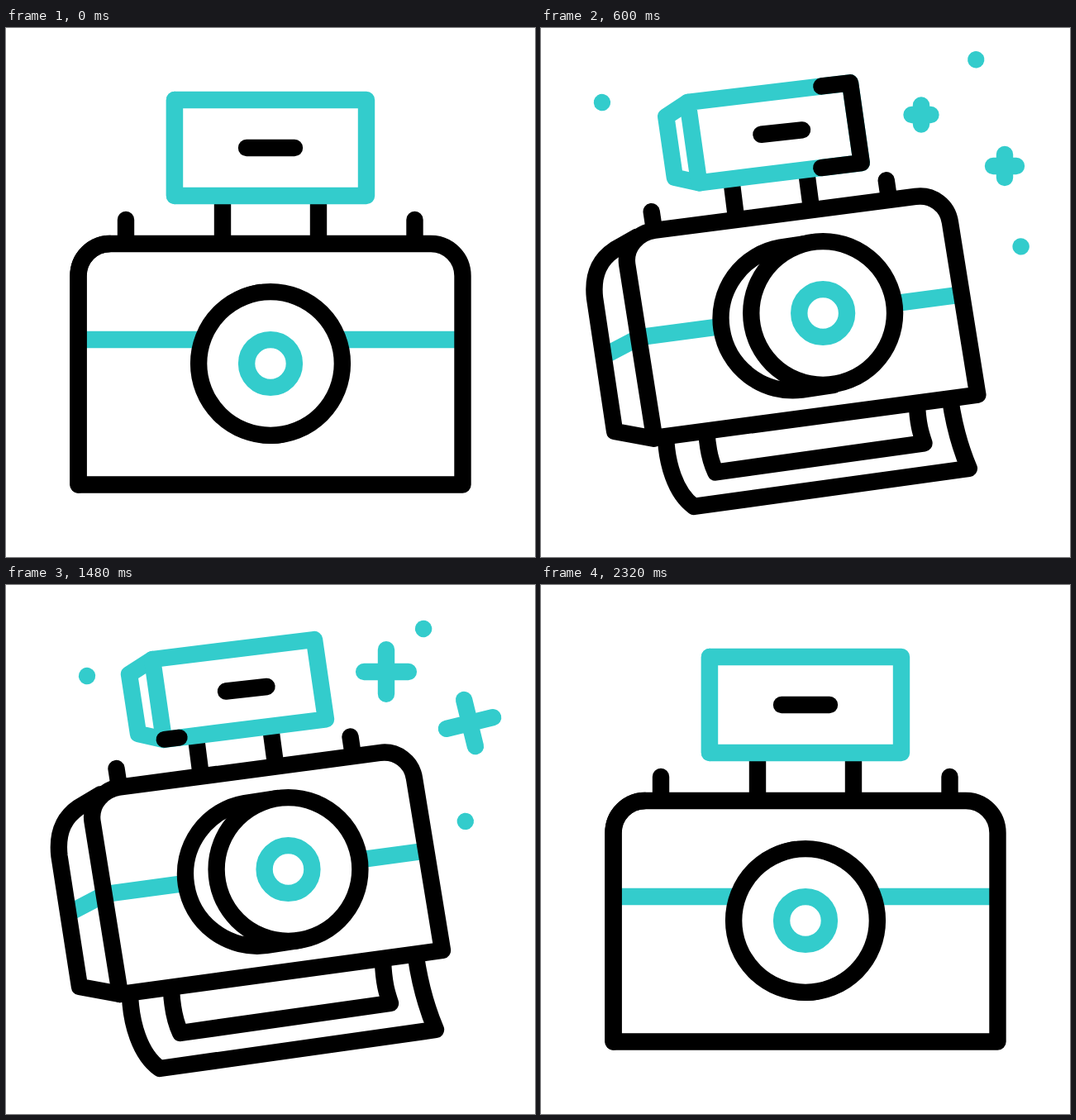
These frames come from a looping animation (640 by 640 pixels, 2600 ms). An HTML page:

```html
<!DOCTYPE html>
<html lang="en">
<head>
<meta charset="utf-8">
<title>Instant camera</title>
<style>
  html, body { margin: 0; width: 100%; height: 100%; overflow: hidden; background: #fff; }
  svg { display: block; width: 100vw; height: 100vh; }
  path, circle {
    fill: none; stroke: #000; stroke-width: 20.4;
    stroke-linecap: round; stroke-linejoin: round;
  }
  .teal { stroke: #3cc; }
  .butt { stroke-linecap: butt; }
  .solid { fill: #fff; }
  .fill { fill: #fff; stroke: none; }
  .pose, .paper, .side, .runner, .plus, .dot { animation: pose 2600ms linear infinite; }

  /* --a is the resting shape, --b the tilted one, --m a plain shift */
  @keyframes pose {
    0%, 2.69% { d: var(--a); translate: 0px 0px; animation-timing-function: cubic-bezier(.4, 0, .45, 1); }
    25.77% { d: var(--b); translate: var(--m, 0px 0px); }
    62% { d: var(--b); translate: var(--m, 0px 0px); animation-timing-function: cubic-bezier(.4, 0, .2, 1); }
    85.1%, 100% { d: var(--a); translate: 0px 0px; }
  }

  /* depth edges pass through --up while tilting, --down and --low on the way back */
  .side { animation-name: side; }
  @keyframes side {
    0%, 2.69% { d: var(--a); animation-timing-function: cubic-bezier(.5, 0, .8, .75); }
    15.38% { d: var(--up); animation-timing-function: ease-out; }
    25.77% { d: var(--b); }
    62% { d: var(--b); animation-timing-function: ease-in; }
    69.23% { d: var(--down); }
    73.85% { d: var(--low); animation-timing-function: ease-out; }
    85.1%, 100% { d: var(--a); }
  }

  .paper { animation-name: paper; }
  @keyframes paper {
    0%, 15.38% { d: var(--a); animation-timing-function: cubic-bezier(.3, .2, .5, 1); }
    25.4% { d: var(--b); }
    61.54% { d: var(--b); animation-timing-function: cubic-bezier(.3, .1, .8, .8); }
    69.23% { d: var(--down); }
    73.08%, 100% { d: var(--a); }
  }

  /* black line running round the flash */
  .runner { animation-name: pose, runner; animation-duration: 2600ms, 2600ms; }
  @keyframes runner {
    0%, 9.2% { stroke-width: 0; stroke-dasharray: .1 99.9; stroke-dashoffset: -16; }
    10% { stroke-width: 20.4; stroke-dasharray: .1 99.9; stroke-dashoffset: -16.5; }
    15.38% { stroke-dasharray: 6.3 93.7; stroke-dashoffset: -20.2; }
    33.85% { stroke-dasharray: 64.5 35.5; stroke-dashoffset: -32.1; animation-timing-function: cubic-bezier(.4, .2, .7, .9); }
    56.92% { stroke-width: 20.4; stroke-dasharray: 3.2 96.8; stroke-dashoffset: -100; }
    58.46%, 100% { stroke-width: 0; stroke-dasharray: .1 99.9; stroke-dashoffset: -103; }
  }

  .plus { vector-effect: non-scaling-stroke; }
  .one { animation-name: plus-one; }
  .two { animation-name: plus-two; }
  @keyframes plus-one {
    0%, 18.46% { scale: .01; stroke-width: 0; }
    20% { scale: .08; stroke-width: 20.4; animation-timing-function: ease-out; }
    33.85%, 53.85% { scale: 1; }
    56.92% { scale: .93; }
    66.15% { scale: .05; stroke-width: 20.4; }
    67.69%, 100% { scale: .01; stroke-width: 0; }
  }
  @keyframes plus-two {
    0%, 18.46% { scale: .01; stroke-width: 0; rotate: 0deg; }
    20% { scale: .25; stroke-width: 20.4; }
    23.08% { scale: .48; animation-timing-function: ease-out; }
    33.85% { scale: .9; }
    41.54% { scale: 1; }
    53.85% { rotate: 0deg; }
    56.92% { scale: 1; rotate: -13.5deg; }
    66.15% { scale: .55; rotate: -75deg; }
    69.23% { scale: .24; rotate: -90deg; }
    71.54% { scale: .02; stroke-width: 20.4; }
    73.08%, 100% { scale: .01; stroke-width: 0; rotate: -90deg; }
  }

  .dot { fill: #3cc; stroke: none; animation-name: orbit; }
  @keyframes orbit {
    0%, 18.46% { r: 0; rotate: calc(var(--s) - 19deg); }
    20% { r: 10.2px; rotate: calc(var(--s) - 17deg); }
    33.85% { rotate: var(--s); }
    44.62% { rotate: calc(var(--s) + 13deg); }
    56.92% { rotate: calc(var(--s) + var(--mid)); }
    69.23% { rotate: calc(var(--s) + var(--end)); }
    71.54% { r: 10.2px; rotate: calc(var(--s) + var(--end) + 6deg); }
    73.08%, 100% { r: 0; rotate: calc(var(--s) + var(--end) + 8deg); }
  }

  .front {
    --a: path("M87.5 552.5 L87.5 300 C87.5 278 105 261 126 261 L514 261 C535 261 552.5 278 552.5 300 L552.5 552.5 Z");
    --b: path("M138 495 L104.5 286 C101.5 265 117 247.5 138 244.5 L452 203 C473 200 491 214 494 234 L528 442 Z");
  }
  .depth {
    --a: path("M87.5 552.5 L87.5 552.5 L87.5 300 C87.5 278 105 261 126 261 L126 261");
    --up: path("M124 513 L90 506 L70 316 C68 289 79 270 99 261 L130 249");
    --b: path("M138 495 L89 486 L64.5 328 C61 297 72 280 88 269 L114 253.5");
    --down: path("M116 519 L88 511 L70 314 C69 288 82 268 103 260 L127 251");
    --low: path("M98 540 L86.5 532 L79 304 C79 281 95 262 117 258 L127 257");
  }
  .barrel {
    --a: path("M307 320 L307 320 A87 87 0 0 0 333 492 L333 492");
    --up: path("M323 277 L295 281 A87 87 0 0 0 321 453 L349 449");
    --b: path("M328.5 258 L289 264 A87 87 0 0 0 315 436 L354.5 430");
    --down: path("M319 283.5 L295.5 286 A87 87 0 0 0 321.5 458 L345 455.5");
    --low: path("M310.5 306.5 L302.3 307 A87 87 0 0 0 328.3 479 L336.5 478.5");
  }
  .flash {
    --a: path("M204 203 L436 203 L436 87 L204 87 Z");
    --b: path("M191 187 L387 162.5 L373 66 L177 90 Z");
  }
  .flash-depth {
    --a: path("M204 87 L204 87 L204 203 L204 203");
    --up: path("M185 89 L172 100 L179 187 L195 191");
    --b: path("M177 90 L149 108 L160 180 L191 187");
    --down: path("M186 88 L176.5 98 L183 190 L195 192");
    --low: path("M197 87 L189.5 94 L193 197 L200 199");
  }
  .outer {
    --a: path("M165 455 C165 465 166 477 170 485 L485 455 C482 450 480 440 480 430");
    --b: path("M150 495 C151 530 162 568 186 585 L520 538 C509 512 501 484 496 450");
    --down: path("M145 505 C146 513 150 525 158 534 L496 504 C492 498 490 492 489 480");
  }
  .inner {
    --a: path("M205 445 C205 450 208 460 215 468 L440 445 C438 440 436 430 436 425");
    --b: path("M200 490 C201 510 204 527 211 542 L465 506 C461 494 457 482 456 455");
    --down: path("M180 490 C180 498 182 505 187 510 L455 482 C453 476 452 470 452 460");
  }
</style>
</head>
<body>
<svg viewBox="0 0 640 640">
  <path class="paper outer"/>
  <path class="paper inner"/>

  <!-- pins and flash legs -->
  <path class="pose" style="--a:path('M145 232 L145 261 M494.5 232 L494.5 261'); --b:path('M133.5 222 L137 245 M416.5 183.5 L420 207')"/>
  <path class="pose butt" style="--a:path('M262 200 L262 261 M378 200 L378 261'); --b:path('M230 185 L236 232 M320 172 L326.5 220')"/>

  <!-- body -->
  <path class="pose front fill"/>
  <path class="pose teal butt" style="--a:path('M87.5 377 L87.5 377 L552.5 377'); --b:path('M75 397.5 L120 374 L505 322')"/>
  <path class="side depth"/>
  <path class="pose front"/>

  <!-- lens -->
  <path class="side barrel solid"/>
  <g class="pose" style="--m:21.5px -62px">
    <circle class="solid" cx="320" cy="406" r="86.9"/>
    <circle class="teal" cx="320" cy="406" r="28.9"/>
  </g>

  <!-- flash -->
  <path class="side flash-depth teal"/>
  <path class="pose flash teal solid"/>
  <path class="pose" style="--a:path('M291 145 L349 145'); --b:path('M266 128.5 L315.5 123')"/>
  <path class="runner flash" pathLength="100"/>

  <!-- sparkles -->
  <g transform="translate(460 105)"><path class="plus one teal" d="M-29 0H29M0-29V29"/></g>
  <g transform="translate(561 167)"><path class="plus two teal" d="M-29 0H29M0-29V29"/></g>
  <g transform="translate(82.3 104.5)"><circle class="dot" cx="16.7" style="--s:253deg; --mid:126deg; --end:202deg"/></g>
  <g transform="translate(512.5 41.1)"><circle class="dot" cx="14" style="--s:1.6deg; --mid:120deg; --end:185deg"/></g>
  <g transform="translate(565.6 272.1)"><circle class="dot" cx="16.9" style="--s:-14deg; --mid:139deg; --end:254deg"/></g>
</svg>
</body>
</html>
```
